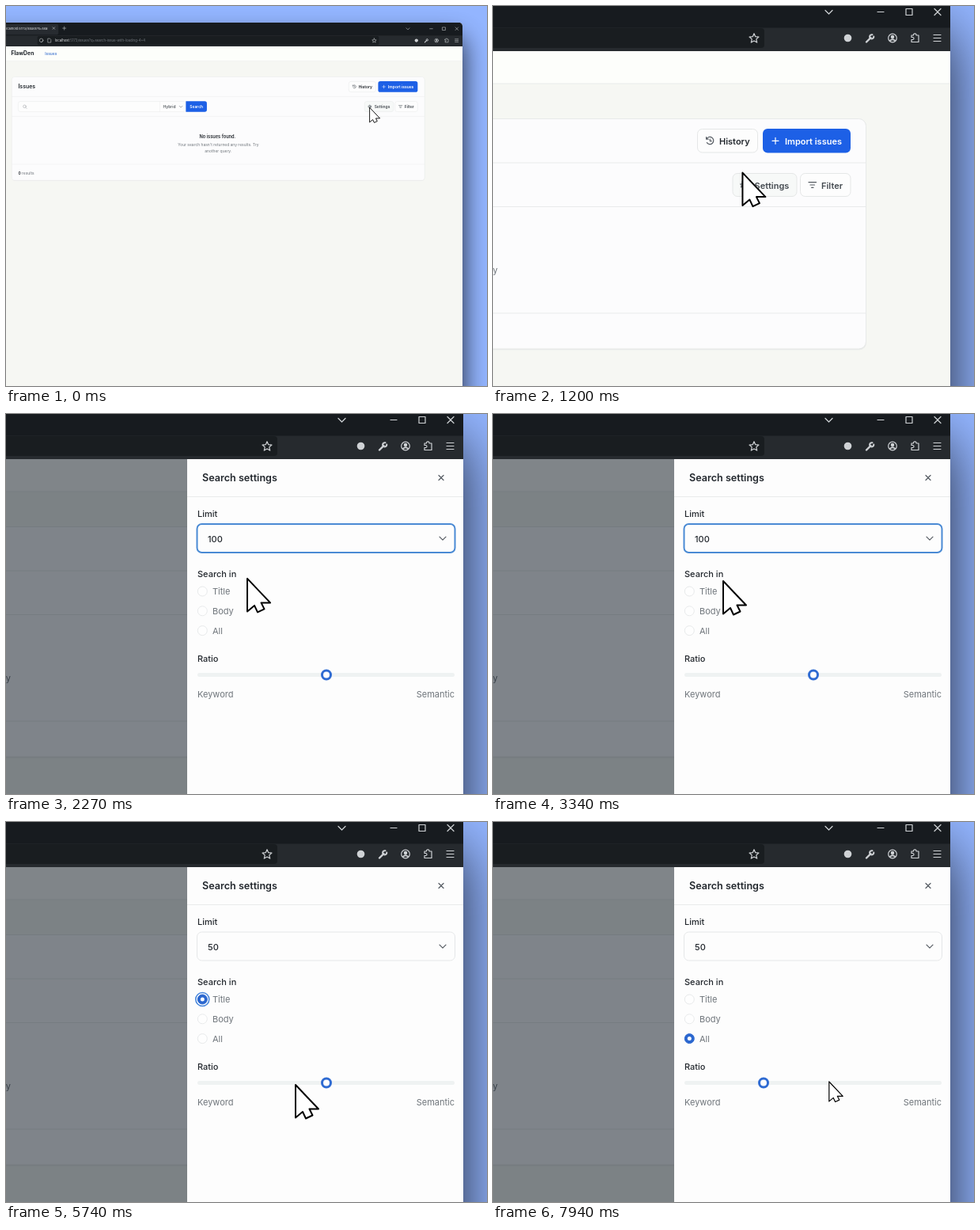
These frames come from a looping animation (608 by 480 pixels, 8000 ms). An HTML page:

```html
<!DOCTYPE html>
<html lang="en">
<head>
<meta charset="utf-8">
<title>Search settings</title>
<style>
  html, body { margin: 0; width: 100%; height: 100%; overflow: hidden; background: #93b5ff; }
  svg { display: block; width: 100vw; height: 100vh; }
  text { font: 400 11px Inter, "Open Sans", sans-serif; fill: #6f757b; }
  .m { font-weight: 500; fill: #22272d; }
  .b { font-weight: 600; fill: #22272d; }
  .h { font-size: 12.6px; }
  .w { fill: #fff; }
  .line { stroke: #e9ebeb; }
  .btn { fill: #fdfdfd; stroke: #e5e7e7; }
  .ico { fill: none; stroke: #cfd2d5; stroke-width: 1.2; stroke-linecap: round; stroke-linejoin: round; }
  .dark { stroke: #555b62; }
</style>
</head>
<body>
<svg viewBox="0 0 608 480" preserveAspectRatio="none">
  <defs>
    <filter id="soft" x="-20%" y="-20%" width="140%" height="140%"><feGaussianBlur stdDeviation="37"/></filter>
    <clipPath id="frame"><rect x="-795" y="-10" width="1373" height="1300" rx="11"/></clipPath>
    <clipPath id="tab"><rect x="-780" y="-6" width="192" height="30"/></clipPath>
  </defs>
  <rect width="608" height="480" fill="#93b5ff"/>
  <g id="world">
    <rect x="-795" y="34" width="1373" height="1300" rx="11" opacity=".8" filter="url(#soft)"/>
    <g clip-path="url(#frame)">
      <!-- page -->
      <rect x="-795" y="-10" width="1373" height="1300" fill="#f6f7f3"/>
      <rect x="-795" y="57" width="1373" height="41" fill="#fdfefb"/>
      <path class="line" d="M-795 98H578"/>
      <text class="b" x="-690" y="82" style="font-size:15.3px;font-weight:700">FlawDen</text>
      <text class="m" x="-595" y="81.5" style="fill:#3d72cf">Issues</text>
      <rect x="-688" y="143" width="1160" height="291.5" rx="9" fill="#e9ebe9"/>
      <rect x="-688" y="142.5" width="1159.5" height="290.5" rx="9" fill="#fcfcfd" stroke="#e8eae9"/>
      <path class="line" d="M-688 198H471M-688 253.5H471M-688 388H471"/>
      <text class="b" x="-670" y="175" style="font-size:15.5px">Issues</text>

      <rect class="btn" x="258.5" y="155.5" width="76" height="29.5" rx="6"/>
      <g class="ico dark"><path d="M270 168a4.6 4.6 0 1 1 .4 4.6M269.6 165.6v2.6h2.6M274.3 168v2.6h2"/></g>
      <text class="b" x="286" y="174.5">History</text>
      <rect x="341" y="155" width="111" height="30.5" rx="6" fill="#1d60e6"/>
      <path class="ico" d="M353 170.3h8M357 166.3v8" style="stroke:#fff"/>
      <text class="b w" x="369" y="174.5">Import issues</text>

      <rect class="btn" x="-670" y="211.5" width="471" height="29" rx="6"/>
      <path class="line" d="M-272 212V240"/>
      <g class="ico" style="stroke:#9a9fa5"><circle cx="-652" cy="225.5" r="4"/><path d="M-649 228.5l3 3"/></g>
      <text class="m" x="-263" y="230.5" style="fill:#444a50">Hybrid</text>
      <path class="ico dark" d="M-217 224.5l4 4 4-4"/>
      <path d="M-199 211H-146a6 6 0 0 1 6 6V235a6 6 0 0 1-6 6H-199z" fill="#1d60e6"/>
      <text class="b w" x="-169.5" y="230.5" text-anchor="middle">Search</text>

      <rect class="btn" x="303" y="211.5" width="81" height="29" rx="6" style="fill:#f7f9f8"/>
      <g class="ico dark"><circle cx="317.5" cy="226" r="3.6"/><circle cx="317.5" cy="226" r="1.4"/>
        <circle cx="317.5" cy="226" r="4.8" stroke-dasharray="1.2 2.57" stroke-linecap="butt"/></g>
      <text class="b" x="330.5" y="230.5" style="fill:#444a50">Settings</text>
      <rect class="btn" x="388.5" y="211.5" width="63.5" height="29" rx="6"/>
      <path class="ico dark" d="M399 222.7h9.5M401 226h5.5M402.6 229.3h2.4"/>
      <text class="b" x="415" y="230.5" style="fill:#444a50">Filter</text>

      <g text-anchor="middle">
        <text class="b h" x="-110" y="315.5">No issues found.</text>
        <text x="-108" y="338">Your search hasn't returned any results. Try</text>
        <text x="-108" y="354.5">another query.</text>
      </g>
      <text x="-670" y="417"><tspan class="b">0</tspan> results</text>

      <!-- browser bars -->
      <rect x="-795" y="-10" width="1373" height="38" fill="#171b1f"/>
      <rect x="-785" y="-5" width="228" height="29" rx="4" fill="#272b30"/>
      <g clip-path="url(#tab)"><text x="-709" y="9.5" style="font-size:9px;fill:#e3e5e7">localhost:5173/issues?s=search</text></g>
      <path class="ico" d="M-573 3l6 6m0-6l-6 6M-545 6h9M-540.5 1.500v9"/>
      <rect x="-795" y="27.500" width="1373" height="29.500" fill="#262a2e"/>
      <rect x="-616" y="28" width="959" height="25" rx="4" fill="#191d20"/>
      <g class="ico"><circle cx="-605" cy="40" r="5"/><path d="M-605 45l3-2M-586 35h5l3 3v8h-8z"/></g>
      <text x="-567" y="43.500" style="font-size:9.500px;fill:#777c82"><tspan fill="#e6e7e9">localhost</tspan>:5173/issues?q=search-issue-with-loading-4+4</text>
      <g class="ico">
        <path d="M420 5.500l4.500 4.500 4.500-4.500M486 7.500h8M522 3.500h8v8h-8zM558 3.500l8 8m0-8l-8 8"/>
        <path id="star"/>
        <path d="M557 36.500h9M557 40.500h9M557 44.500h9"/>
        <path d="M472 45.500l5.500-5.500" stroke-width="2.400"/>
        <path d="M479.500 36.300a2.600 2.600 0 1 0 1.800 2.200" stroke-width="2"/>
        <circle cx="505" cy="40.500" r="5.300"/><circle cx="505" cy="39" r="1.700" fill="#cfd2d5"/><path d="M502 43.600q3-2.800 6 0" stroke-width="1.800"/>
        <path d="M529 37h2.500a1.800 1.800 0 1 1 3.500 0h3v8.500h-9v-3h1.500a1.500 1.500 0 0 0 0-3H529z"/>
      </g>
      <circle cx="448.500" cy="40.500" r="4.800" fill="#cfd2d5"/>

      <rect id="dim" x="-795" y="57" width="1373" height="1230" fill="#050f18"/>

      <!-- slide-over -->
      <g id="panel">
        <rect x="229" y="57" width="349" height="1230" fill="#fdfdfd"/>
        <path class="line" d="M229 104.500H578"/>
        <text class="b h" x="248" y="85">Search settings</text>
        <path class="ico dark" d="M547 77.500l6 6m0-6l-6 6"/>
        <text class="m" x="242" y="129.500">Limit</text>
        <rect id="box" x="241.500" y="139" width="326" height="36" rx="6" fill="#fdfdfd"/>
        <text class="m" id="limit" x="255" y="161.500"></text>
        <path class="ico dark" d="M548 155.200l4 4 4-4"/>
        <text class="m" x="242" y="206">Search in</text>
        <g id="radios"></g>
        <text class="m" x="242" y="312.500">Ratio</text>
        <rect x="242" y="327" width="325" height="5" rx="2.500" fill="#eff2f2"/>
        <circle id="thumb" cy="329.500" r="5.500" fill="#fff" stroke="#2f6bd2" stroke-width="3"/>
        <text x="242" y="357.500">Keyword</text>
        <text x="567" y="357.500" text-anchor="end">Semantic</text>
      </g>
    </g>
    <path id="cursor" d="M0 0V41.500L9 34l4 8.500 8.500-4-4-8H29z" fill="#fff" stroke="#000" stroke-width="2" stroke-linejoin="round"/>
  </g>
</svg>
<script>
const LOOP = 8000, OUT = 0.4494;
const $ = id => document.getElementById(id);
const set = (el, attrs) => { for (const k in attrs) el.setAttribute(k, attrs[k]); };
const clamp = v => Math.max(0, Math.min(1, v));
const mix = (a, b, p) => a + (b - a) * p;
const smooth = u => u * u * (3 - 2 * u);

// Fast start, long settle; the zoom is already under way when the loop begins.
const settle = u => 1 - (1 - u) ** 3 * (1 + 3 * u);
const U0 = 0.132, E0 = settle(U0);
const zoom = t => mix(OUT, 1, (settle(clamp(U0 + t / 1080)) - E0) / (1 - E0));

// cubic-bezier(.4, 0, .2, 1)
function glide(x) {
  let lo = 0, hi = 1;
  for (let i = 0; i < 20; i++) {
    const s = (lo + hi) / 2;
    const bx = 1.2 * s * (1 - s) ** 2 + 0.6 * s * s * (1 - s) + s ** 3;
    if (bx < x) lo = s; else hi = s;
  }
  return lo * lo * (3 - 2 * lo);
}

// time, x, y of the pointer tip
const path = [
  [0, 317, 228.5], [1000, 317, 228.5], [1600, 311, 160], [2000, 311, 160],
  [2600, 297, 272], [2850, 297, 272], [3300, 291, 211], [3450, 291, 211],
  [3780, 285, 268], [3950, 285, 268], [4400, 247, 221], [4800, 247, 221],
  [5740, 366, 332], [5950, 358, 341], [6480, 248, 273], [6700, 248, 273],
  [7540, 342, 328], [7600, 342, 328], [8000, 430, 328]
];
function tip(t) {
  let i = 1;
  while (i < path.length - 1 && t > path[i][0]) i++;
  const [a, b] = [path[i - 1], path[i]];
  const p = smooth(clamp((t - a[0]) / (b[0] - a[0])));
  return [mix(a[1], b[1], p), mix(a[2], b[2], p)];
}

const clicks = [1920, 3860, 4770, 6560];
function press(t) {
  const held = smooth(clamp((t - 7360) / 130));
  return Math.max(held, ...clicks.map(c => smooth(clamp(1 - Math.abs(t - c) / 120))));
}

const radios = ["Title", "Body", "All"].map((name, i) => {
  const y = 224 + i * 24.8;
  const add = (tag, attrs) => {
    const el = document.createElementNS("http://www.w3.org/2000/svg", tag);
    set(el, attrs);
    return $("radios").appendChild(el);
  };
  const ring = add("circle", { cx: 248.3, cy: y, r: 8.5, fill: "#fff", stroke: "#4a88dc", "stroke-width": 1.6 });
  const disc = add("circle", { cx: 248.3, cy: y, r: 6 });
  const dot = add("circle", { cx: 248.3, cy: y, r: 2.5, fill: "#fff" });
  add("text", { x: 261, y: y + 4 }).textContent = name;
  return (on, focus) => {
    set(ring, { opacity: focus ? 1 : 0 });
    set(disc, { fill: on ? "#2b67cf" : "#fefefe", stroke: on ? "#2b67cf" : "#e8eaeb" });
    set(dot, { opacity: on ? 1 : 0 });
  };
});

let star = "";
for (let i = 0; i < 10; i++) {
  const r = i % 2 ? 2.9 : 6.3, a = i * Math.PI / 5;
  star += (i ? "L" : "M") + (330 + r * Math.sin(a)) + " " + (41 - r * Math.cos(a));
}
set($("star"), { d: star + "z" });

function draw(t) {
  const k = zoom(t);
  set($("world"), { transform: `translate(${576.3 * (1 - k)} ${46.1 * (1 - k)}) scale(${k})` });

  set($("dim"), { opacity: 0.5 * glide(clamp((t - 1220) / 320)) });
  const open = glide(clamp((t - 1220) / 500));
  set($("panel"), { transform: `translate(${349 * (1 - open)} 0)`, visibility: open > 0 ? "visible" : "hidden" });

  const focus = t >= 1960 && t < 4830;
  set($("box"), { stroke: focus ? "#4a8ad4" : "#e5e7e8", "stroke-width": focus ? 2 : 1 });
  $("limit").textContent = t < 3920 ? "100" : "50";

  const picked = t < 4830 ? -1 : t < 6620 ? 0 : 2;
  radios.forEach((show, i) => show(i === picked, i === picked && t < 7500));
  set($("thumb"), { cx: t < 7560 ? 405 : 342 });

  const [x, y] = tip(t);
  set($("cursor"), { transform: `translate(${x} ${y}) scale(${1 - 0.4 * press(t)})` });
}

const start = performance.now();
function tick() {
  draw((performance.now() - start) % LOOP);
  requestAnimationFrame(tick);
}
tick();
</script>
</body>
</html>
```
